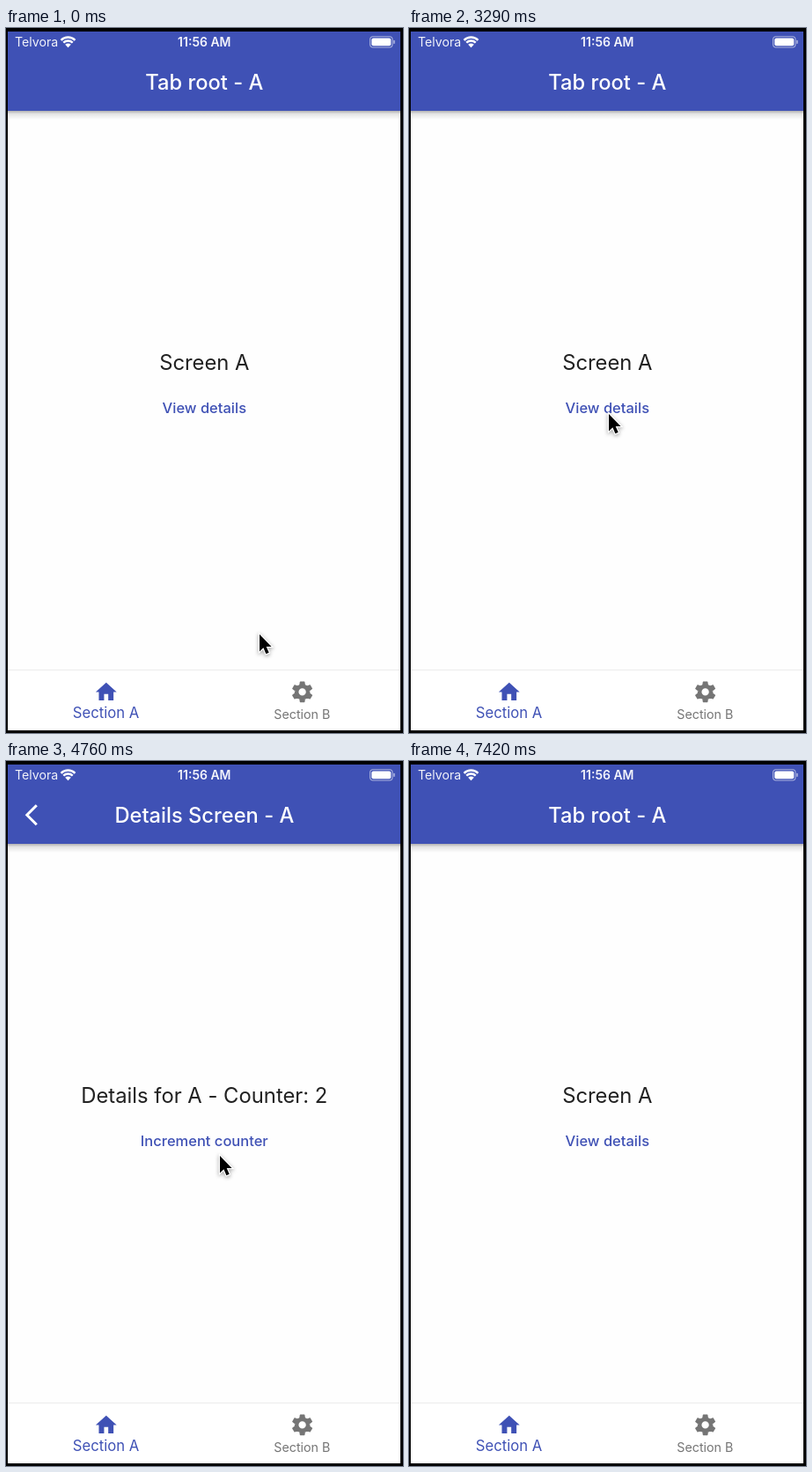
Animation, 451 px wide and 800 px high, one loop 7.49 s. Source, as an HTML page with a canvas:

```html
<!DOCTYPE html>
<html lang="en">
<head>
<meta charset="utf-8">
<title>Tab navigation</title>
<style>
html, body { margin: 0; width: 100%; height: 100%; overflow: hidden; background: #000; }
canvas { display: block; width: 451px; height: 800px; }
</style>
</head>
<body>
<canvas id="stage"></canvas>
<script>
const W = 451, H = 800, LOOP = 7490, STEP = 70;
const VIEW = { x: 2, y: 4, w: 446, h: 793 };
const BAR_BOTTOM = 94, NAV_TOP = 728.5, MID = 225.3;
const U = VIEW.w / 375; // one logical point
const INDIGO = [63, 81, 181], GREY = [117, 117, 117];
const FONT = 'Inter, "Open Sans", sans-serif';

const canvas = document.getElementById('stage');
const ctx = canvas.getContext('2d');
const dpr = window.devicePixelRatio || 1;
canvas.width = W * dpr;
canvas.height = H * dpr;

// Cursor waypoints: time, x, y
const PATH = [
  [0, 288, 688], [210, 311, 690], [560, 350, 806], [910, 366, 806], [1330, 345, 753],
  [1750, 345, 753], [2240, 113, 757], [2590, 113, 757], [2800, 187, 652],
  [3010, 220, 535], [3220, 227, 438], [3570, 227, 438], [3920, 243, 448],
  [4760, 243, 448], [5460, 338, 747], [5880, 338, 747], [6510, 110, 759],
  [7140, 110, 759], [7400, 122, 808], [LOOP, 122, 808]
];

// Press intervals: from, to
const CLICKS = [
  [1470, 1610], [2310, 2450], [3360, 3500], [4200, 4320],
  [4480, 4600], [5600, 5740], [6720, 6830], [6930, 7040]
];

const TAB_SWITCHES = [[0, 0], [1610, 1], [2450, 0], [5740, 1], [6830, 0]];
const PUSH = 3500, POP = 7040, SLIDE = 350;

const clamp = v => Math.max(0, Math.min(1, v));
const lerp = (a, b, k) => a + (b - a) * k;
const smooth = k => k * k * (3 - 2 * k);
const easeOut = k => 1 - Math.pow(1 - k, 3);
const rgb = c => `rgb(${c.map(Math.round).join(',')})`;

function text(s, x, y, size, weight, color, align = 'center') {
  ctx.font = `${weight} ${size}px ${FONT}`;
  ctx.textAlign = align;
  ctx.fillStyle = color;
  ctx.fillText(s, x, y);
}

function roundRect(x, y, w, h, r) {
  ctx.beginPath();
  ctx.roundRect(x, y, w, h, r);
}

function cursorAt(t) {
  let i = 0;
  while (i < PATH.length - 2 && PATH[i + 1][0] <= t) i++;
  const [t0, x0, y0] = PATH[i], [t1, x1, y1] = PATH[i + 1];
  // Keep speed through the two bends on the way up
  const raw = clamp((t - t0) / (t1 - t0));
  const k = t0 >= 2590 && t0 < 3010 ? raw : smooth(raw);
  return [lerp(x0, x1, k), lerp(y0, y1, k)];
}

function drawStatus() {
  text('Telvora', 10, 21, 14.2, 400, '#f2f3fa', 'left');
  text('11:56 AM', MID, 21, 14, 600, '#f5f6fc');

  ctx.strokeStyle = ctx.fillStyle = '#fff';
  ctx.lineWidth = 2.5;
  const a = -Math.PI / 2, spread = 0.76;
  for (const r of [11.6, 7.6]) {
    ctx.beginPath();
    ctx.arc(70.5, 22.2, r, a - spread, a + spread);
    ctx.stroke();
  }
  ctx.beginPath();
  ctx.moveTo(70.5, 22.2);
  ctx.arc(70.5, 22.2, 4.8, a - spread, a + spread);
  ctx.fill();

  ctx.strokeStyle = 'rgba(255,255,255,.55)';
  ctx.lineWidth = 1.1;
  roundRect(413.6, 9.7, 25.4, 12.3, 3.4);
  ctx.stroke();
  roundRect(415.3, 11.4, 22, 8.9, 2);
  ctx.fill();
  ctx.fillStyle = 'rgba(255,255,255,.6)';
  roundRect(440.2, 13.8, 1.5, 4.3, 1);
  ctx.fill();
}

function drawPage(page, shift) {
  ctx.save();
  ctx.translate(shift, 0);
  ctx.fillStyle = '#fefefe';
  ctx.fillRect(VIEW.x, VIEW.y, VIEW.w, NAV_TOP - VIEW.y);

  const shade = ctx.createLinearGradient(0, BAR_BOTTOM, 0, BAR_BOTTOM + 10);
  shade.addColorStop(0, 'rgba(0,0,0,.3)');
  shade.addColorStop(0.35, 'rgba(0,0,0,.1)');
  shade.addColorStop(1, 'rgba(0,0,0,0)');
  ctx.fillStyle = shade;
  ctx.fillRect(VIEW.x, BAR_BOTTOM, VIEW.w, 10);
  ctx.fillStyle = rgb(INDIGO);
  ctx.fillRect(VIEW.x, VIEW.y, VIEW.w, BAR_BOTTOM - VIEW.y);

  text(page.title, MID, 69.6, 23.7, 500, '#fff');
  text(page.body, MID, 387.6, 23.8, 400, '#212121');
  text(page.action, MID, 436.8, 16.5, 500, rgb(INDIGO));

  if (page.back) {
    ctx.strokeStyle = '#fff';
    ctx.lineWidth = 3;
    ctx.beginPath();
    ctx.moveTo(34.8, 50.3);
    ctx.lineTo(23.8, 61.3);
    ctx.lineTo(34.8, 72.3);
    ctx.stroke();
  }
  ctx.restore();
}

const rootPage = name => ({
  title: `Tab root - ${name}`, body: `Screen ${name}`, action: 'View details'
});
const detailsPage = count => ({
  title: 'Details Screen - A', body: `Details for A - Counter: ${count}`,
  action: 'Increment counter', back: true
});

function drawContent(t, tab) {
  ctx.save();
  ctx.beginPath();
  ctx.rect(VIEW.x, VIEW.y, VIEW.w, NAV_TOP - VIEW.y);
  ctx.clip();
  if (tab === 1) {
    drawPage(rootPage('B'), 0);
  } else {
    const open = t < POP
      ? easeOut(clamp((t - PUSH) / SLIDE))
      : 1 - easeOut(clamp((t - POP) / SLIDE));
    if (open < 1) drawPage(rootPage('A'), -VIEW.w / 3 * open);
    if (open > 0) {
      const left = VIEW.w * (1 - open);
      if (open < 1) {
        const edge = ctx.createLinearGradient(left - 20, 0, left + 2, 0);
        edge.addColorStop(0, 'rgba(0,0,0,0)');
        edge.addColorStop(1, 'rgba(0,0,0,.08)');
        ctx.fillStyle = edge;
        ctx.fillRect(left - 20, VIEW.y, 22, NAV_TOP);
      }
      const count = (t >= 4320) + (t >= 4600);
      drawPage(detailsPage(count), left);
    }
  }
  ctx.restore();
}

const HOME = new Path2D('M-2 8V2h4v6h5V0h3L0-9-10 0h3v8z');

function makeGear() {
  const p = new Path2D();
  p.arc(0, 0, 7.5, 0, 2 * Math.PI);
  for (let i = 0; i < 6; i++) {
    const a = i * Math.PI / 3, c = Math.cos(a), s = Math.sin(a);
    const at = (x, y) => [x * c - y * s, x * s + y * c];
    p.moveTo(...at(-3, -5.5));
    p.lineTo(...at(-2.35, -9.6));
    p.quadraticCurveTo(...at(-2.3, -10), ...at(-1.9, -10));
    p.lineTo(...at(1.9, -10));
    p.quadraticCurveTo(...at(2.3, -10), ...at(2.35, -9.6));
    p.lineTo(...at(3, -5.5));
    p.closePath();
  }
  p.moveTo(3.5, 0);
  p.arc(0, 0, 3.5, 0, 2 * Math.PI, true);
  return p;
}
const GEAR = makeGear();

function drawTab(icon, label, x, active) {
  const color = rgb(GREY.map((g, i) => lerp(g, INDIGO[i], active)));
  ctx.save();
  ctx.translate(x + 0.3, 753.4);
  ctx.scale(U, U);
  ctx.fillStyle = color;
  ctx.fill(icon);
  ctx.restore();
  text(label, x, lerp(783.7, 783.1, active), lerp(12, 14, active) * U, 400, color);
}

function drawNav(t, tab, since) {
  ctx.fillStyle = '#fff';
  ctx.fillRect(VIEW.x, NAV_TOP, VIEW.w, VIEW.y + VIEW.h - NAV_TOP);
  ctx.fillStyle = '#ebebeb';
  ctx.fillRect(VIEW.x, NAV_TOP - 0.5, VIEW.w, 1);

  // Touch ripple on the pressed tab
  for (const [from, to] of CLICKS) {
    const [x, y] = cursorAt(from);
    if (y < NAV_TOP || t <= from || t > to + 210) continue;
    const alpha = 0.22 * (1 - clamp((t - to) / 210));
    ctx.fillStyle = `rgba(200,200,200,${alpha})`;
    ctx.beginPath();
    ctx.arc(x, y, 35 * U * clamp((t - from) / 280), 0, 2 * Math.PI);
    ctx.save();
    ctx.clip();
    ctx.fillRect(VIEW.x, NAV_TOP + 1, VIEW.w, VIEW.y + VIEW.h - NAV_TOP - 1);
    ctx.restore();
  }

  const k = since === 0 ? 1 : smooth(clamp((t - since) / 200));
  const b = tab === 1 ? k : 1 - k;
  drawTab(HOME, 'Section A', 113.5, 1 - b);
  drawTab(GEAR, 'Section B', 336.3, b);
}

const ARROW = new Path2D('M0 0V19.4L4.4 15.2 7.4 22.2 10.7 20.8 7.7 13.9H13.6Z');

function drawCursor(t) {
  const [x, y] = cursorAt(t);
  if (CLICKS.some(([from, to]) => t >= from && t < to)) {
    ctx.fillStyle = 'rgba(246,228,48,.52)';
    ctx.beginPath();
    ctx.arc(x - 2, y + 2, 27, 0, 2 * Math.PI);
    ctx.fill();
  }
  ctx.save();
  ctx.translate(x, y);
  ctx.lineJoin = 'miter';
  ctx.strokeStyle = '#fff';
  ctx.lineWidth = 2.4;
  ctx.shadowColor = 'rgba(0,0,0,.4)';
  ctx.shadowBlur = 4 * dpr;
  ctx.shadowOffsetY = 1.5 * dpr;
  ctx.stroke(ARROW);
  ctx.shadowColor = 'transparent';
  ctx.fillStyle = '#000';
  ctx.fill(ARROW);
  ctx.restore();
}

function draw(t) {
  ctx.setTransform(dpr, 0, 0, dpr, 0, 0);
  ctx.fillStyle = '#000';
  ctx.fillRect(0, 0, W, H);
  const [since, tab] = TAB_SWITCHES.filter(s => s[0] <= t).pop();
  drawContent(t, tab);
  drawStatus();
  drawNav(t, tab, since);
  drawCursor(t);
}

const start = performance.now();
function tick() {
  const t = (performance.now() - start) % LOOP;
  draw(Math.floor(t / STEP) * STEP);
  requestAnimationFrame(tick);
}
tick();
</script>
</body>
</html>
```
